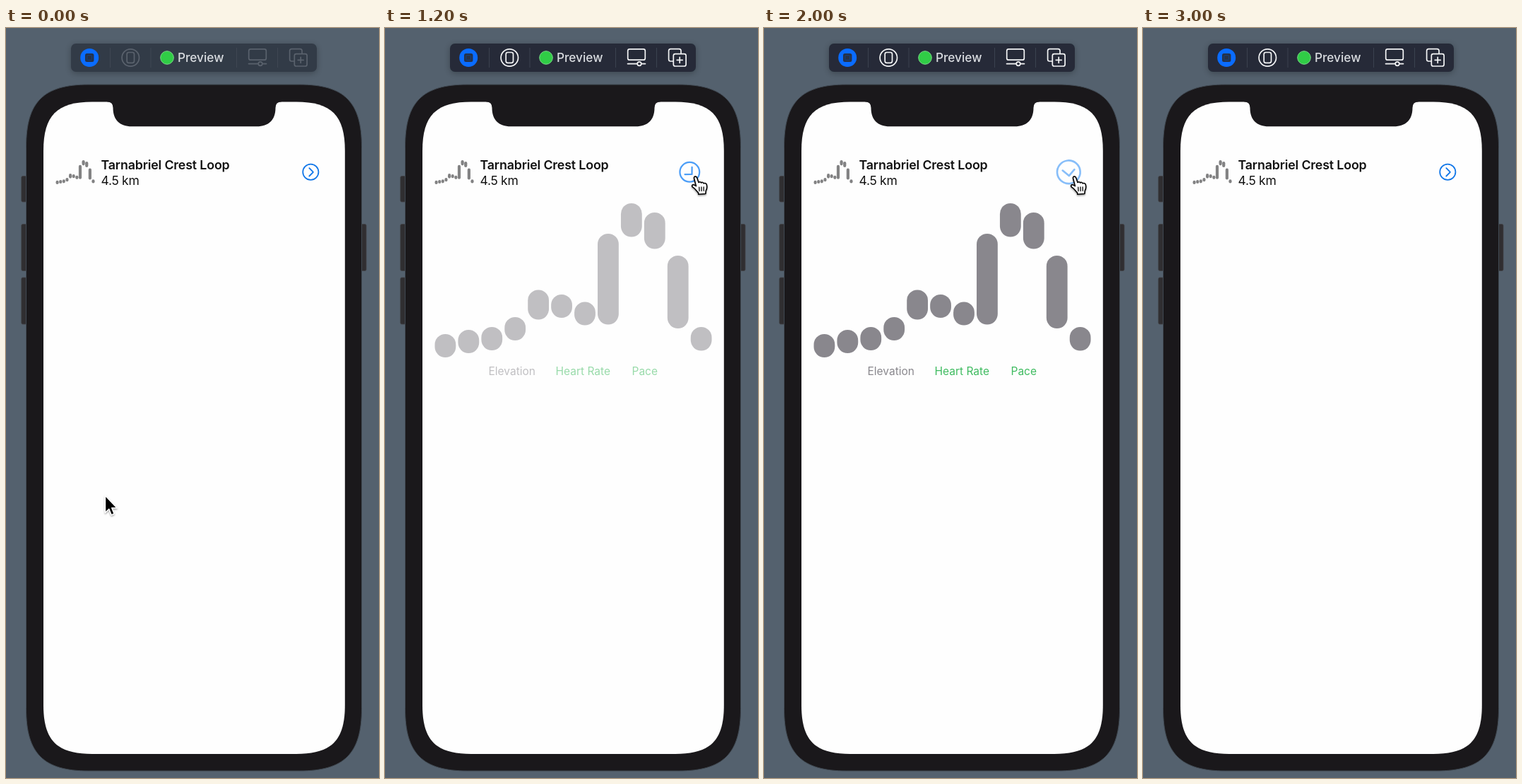
Animation of 528x1061 px, one loop 3200 ms. Source, as an HTML page:

```html
<!DOCTYPE html>
<html lang="en">
<head>
<meta charset="utf-8">
<title>Trail row preview</title>
<style>
html, body { margin: 0; width: 100%; height: 100%; overflow: hidden; background: #54616e; }
svg { display: block; width: 100vw; height: 100vh; }
text { font-family: Inter, "Open Sans", sans-serif; }
.line { fill: none; stroke-linecap: round; stroke-linejoin: round; }
</style>
</head>
<body>
<svg viewBox="0 0 528 1061" xmlns="http://www.w3.org/2000/svg">
  <defs>
    <filter id="soft" x="-20%" y="-60%" width="140%" height="240%">
      <feDropShadow dx="0" dy="2" stdDeviation="5" flood-color="#000" flood-opacity=".28"/>
    </filter>
    <filter id="drop" x="-40%" y="-40%" width="200%" height="200%">
      <feDropShadow dx="0" dy="1.5" stdDeviation="1.3" flood-color="#000" flood-opacity=".4"/>
    </filter>
    <g id="bars"></g>
  </defs>
  <rect width="528" height="1061" fill="#54616e"/>

  <g fill="#302e31" stroke="#424347" stroke-width=".8">
    <rect x="21.8" y="209.5" width="9" height="36.5" rx="2"/>
    <rect x="21.8" y="277.5" width="9" height="66" rx="2"/>
    <rect x="21.8" y="353" width="9" height="66" rx="2"/>
    <rect x="501" y="277.5" width="9" height="66" rx="2"/>
  </g>
  <path id="body" fill="#1a181b" stroke="#414a53"/>
  <path id="screen" fill="#fefefe"/>
  <path fill="#1a181b" d="M143 103V104.300Q151.500 104.600 151.500 113C151.500 130 161 139.300 178 139.300H355C372 139.300 381.500 130 381.500 113Q381.500 104.600 390 104.300V103Z"/>

  <rect id="bar" x="92" y="22" width="348" height="40" rx="7" filter="url(#soft)"/>
  <path d="M147.500 28V56M205 28V56M326.500 28V56M384.500 28V56" stroke="#454d59" stroke-width="1" opacity=".7"/>
  <circle cx="118.200" cy="42" r="13" fill="#0a6cff"/>
  <rect x="112" y="36" width="12.400" height="12" rx="2.500" fill="#263248"/>
  <rect x="114.800" y="38.700" width="6.800" height="6.600" rx="1" fill="none" stroke="#17407f"/>
  <circle cx="228" cy="42" r="9.300" fill="#30cd46" stroke="#7ad988" stroke-width="1"/>
  <text x="243" y="48" font-size="17.200" font-weight="500" fill="#dadde1">Preview</text>
  <g id="icons" class="line" stroke-width="1.700">
    <circle cx="176.300" cy="42" r="12.200"/>
    <rect x="171.200" y="34.500" width="10.300" height="14.800" rx="2.500"/>
    <rect x="343.700" y="29.800" width="24.600" height="15.400" rx="2.500"/>
    <path d="M343.500 50.600H357M363 50.600H368.500"/>
    <circle cx="360" cy="50.600" r="2.800"/>
    <path d="M408 47H404.300Q401.600 47 401.600 44.300V32.300Q401.600 29.600 404.300 29.600H416.300Q419 29.600 419 32.300V36"/>
    <rect x="408.300" y="36.600" width="17.800" height="17.400" rx="2.500"/>
    <path d="M417.200 41.300V49.300M413.200 45.300H421.200"/>
  </g>

  <use href="#bars" fill="#828283" transform="translate(70.500 187) scale(.1405 .156) translate(-70.500 -248)"/>
  <text x="134.500" y="199.500" font-size="17.800" font-weight="600" letter-spacing="-.15" fill="#111">Tarnabriel Crest Loop</text>
  <text x="134.500" y="222" font-size="17.500" letter-spacing="-.3" fill="#111">4.5 km</text>

  <g id="detail" font-size="15.500">
    <use href="#bars" fill="#838187"/>
    <text x="146.500" y="490.500" fill="#838187">Elevation</text>
    <text x="241.500" y="490.500" fill="#34b857">Heart Rate</text>
    <text x="349.500" y="490.500" fill="#34b857">Pace</text>
  </g>
  <g id="button" class="line" stroke="#1277e8" stroke-width="1.800">
    <circle r="11.100"/>
    <path d="M-2 -5.700L3.600 0L-2 5.700"/>
  </g>

  <g id="arrow" filter="url(#drop)">
    <path d="M0 0V24L5.300 19L8.700 27.300L12.600 25.700L9.200 17.500H16.500Z" fill="#000" stroke="#fff" stroke-width="1.400" stroke-linejoin="round"/>
  </g>
  <g id="hand" filter="url(#drop)">
    <path d="M4.500 3.500C4 .8 7.600 .2 8.600 2.800L11 9.500C11.600 8.400 14 8.400 14.600 10C15.600 8.900 17.800 9.200 18.300 11C19.500 10 22 10.700 22.300 12.600C23 15.500 23 18.500 21.300 21L20.800 25.500L10.800 26.300L10.500 24C8.500 22.500 6.500 18.500 3 16.400C.5 14.800 1.600 12 4.300 12.800L7.400 14.600Z" fill="#fff" stroke="#000" stroke-width="1.600" stroke-linejoin="round"/>
    <path class="line" d="M11.700 16.200L12 21.600M14.900 16L15.100 21.500M18.100 15.800L18.200 21.300" stroke="#000" stroke-width="1.300"/>
  </g>
</svg>
<script>
const $ = id => document.getElementById(id);
const set = (id, attrs) => {
  for (const k in attrs) $(id).setAttribute(k, attrs[k]);
};

// Rounded box with continuous-curvature corners
function squircle(x0, y0, x1, y1, r) {
  const l = 1.28 * r, c = 0.355 * r;
  return `M${x0 + l} ${y0}H${x1 - l}C${x1 - c} ${y0} ${x1} ${y0 + c} ${x1} ${y0 + l}` +
    `V${y1 - l}C${x1} ${y1 - c} ${x1 - c} ${y1} ${x1 - l} ${y1}` +
    `H${x0 + l}C${x0 + c} ${y1} ${x0} ${y1 - c} ${x0} ${y1 - l}` +
    `V${y0 + l}C${x0} ${y0 + c} ${x0 + c} ${y0} ${x0 + l} ${y0}Z`;
}
set('body', { d: squircle(28.5, 80, 503.5, 1051, 69) });
set('screen', { d: squircle(53, 104.5, 479.8, 1027, 54) });

// Top and bottom of each capsule
const ranges = [
  [433, 466], [427, 460], [423, 456], [409, 442], [370.5, 412.5], [377, 410],
  [387.5, 420.5], [291, 419.5], [248, 295.5], [261, 312.5], [322, 425], [423, 456.5]
];
$('bars').innerHTML = ranges.map(([top, end], i) =>
  `<rect x="${70.5 + i * 32.93}" y="${top}" width="29.8" height="${end - top}" rx="14.9"/>`
).join('');

const LOOP = 3200, STEP = 100;
const phase = (t, a, b) => Math.min(1, Math.max(0, (t - a) / (b - a)));
const ease = u => u * u * (3 - 2 * u);
const lerp = (a, b, u) => a + (b - a) * u;

function draw(t) {
  const active = t >= 200;
  set('bar', { fill: active ? '#262c38' : '#333a46' });
  set('icons', { stroke: active ? '#f4f5f6' : '#5a626d' });

  const opening = ease(phase(t, 1025, 1375));
  const closing = ease(phase(t, 1950, 2300));
  const open = opening - closing;
  set('detail', { opacity: open });

  // The button dims while pressed and recovers with the transition
  let alpha = 1;
  if (t >= 1900) alpha = lerp(0.45, 1, closing);
  else if (t >= 1000) alpha = lerp(0.45, 1, opening);
  set('button', {
    opacity: alpha,
    stroke: open > 0 ? '#0a7af5' : '#1277e8',
    transform: `translate(431.3 203.8) rotate(${90 * open}) scale(${1 + 0.5 * open})`
  });

  const x = lerp(134, 433, ease(phase(t, 0, 580)));
  const y = lerp(660, 209, ease(phase(t, 0, 700)));
  set('arrow', { opacity: active ? 0 : 1, transform: `translate(${x + 6.5} ${y + 1.5})` });
  set('hand', {
    opacity: active ? 1 - phase(t, 2600, 3000) : 0,
    transform: `translate(${x} ${y})`
  });
}

const start = performance.now();
function tick() {
  const t = (performance.now() - start) % LOOP;
  draw(Math.floor(t / STEP) * STEP);
  requestAnimationFrame(tick);
}
tick();
</script>
</body>
</html>
```
